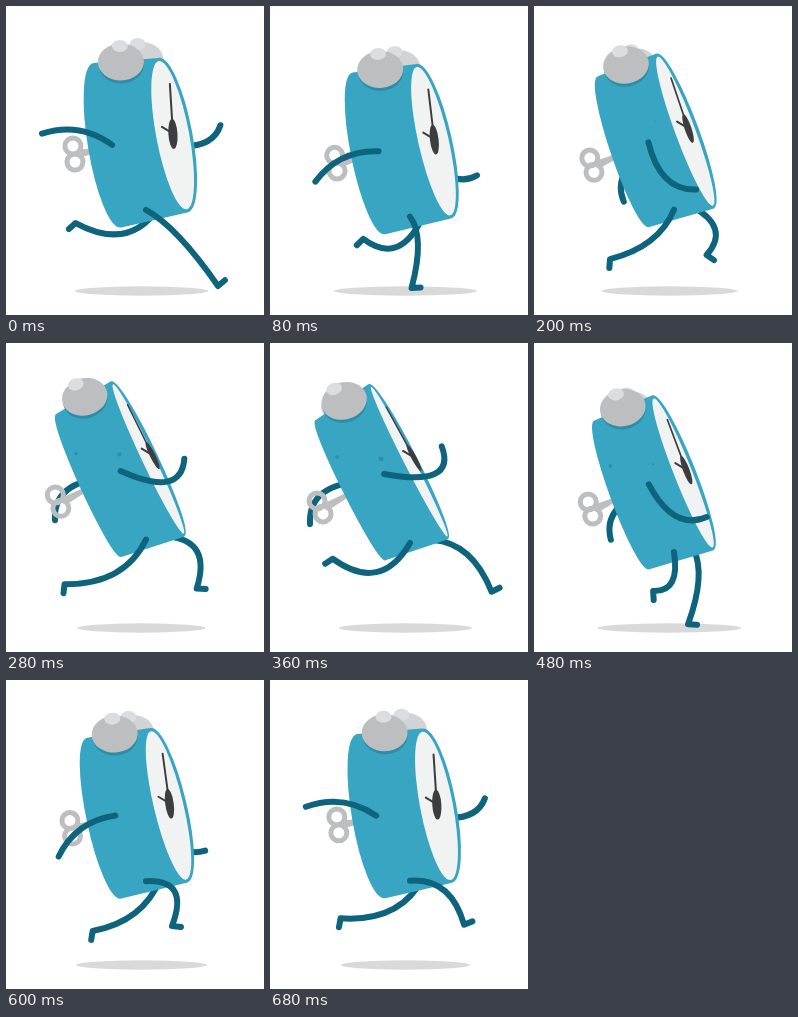
Animation of 258 by 309 pixels, one loop 0.72 s. Source, as an HTML page:

```html
<!DOCTYPE html>
<html lang="en">
<head>
<meta charset="utf-8">
<title>Running alarm clock</title>
<style>
  html, body { margin: 0; width: 100%; height: 100%; overflow: hidden; background: #fff; }
  svg { display: block; width: 100vw; height: 100vh; }
  .limb { fill: none; stroke: #0e647c; stroke-width: 6; stroke-linecap: round; stroke-linejoin: round; }
  .hand { fill: none; stroke: #3d3d3f; stroke-linecap: round; }
</style>
</head>
<body>
<svg id="stage" viewBox="0 0 258 309"></svg>
<script>
const LOOP = 720, STEP = 40, GROUND = 282;
const STEEL = '#bcbec0', TEAL = '#38a5c3', INK = '#3d3d3f';
const FAR_LAG = 390;
const rad = d => d * Math.PI / 180;
const wave = (t, beats, peak = 0) => Math.cos(2 * Math.PI * beats * (t - peak) / LOOP);

// One stride: time, knee bend x y, ankle x y, toe angle. x counts from the hip.
const STRIDE = [
  [0,   31, 221, 72, 280, -40],
  [85,  14, 231, -2, 282, 0],
  [205, -16, 241, -66, 252, 97],
  [285, -22, 242, -82, 240, 98],
  [345, -30, 248, -81, 214, 146],
  [445, -14, 262, -45, 244, 118],
  [530, 38, 222, 14, 249, 35],
  [600, 44, 199, 26, 246, 6],
  [685, 40, 198, 56, 246, -24]
];

// Smooth periodic curve through the key poses
function pose(rows, t) {
  t = (t % LOOP + LOOP) % LOOP;
  const n = rows.length;
  let i = n - 1;
  while (rows[i][0] > t) i--;
  const row = k => rows[(k + n) % n];
  const time = k => row(k)[0] + LOOP * Math.floor(k / n);
  const [t0, t1, t2, t3] = [i - 1, i, i + 1, i + 2].map(time);
  const h = t2 - t1, u = (t - t1) / h, v = 1 - u;
  return row(i).slice(1).map((b, j) => {
    const a = row(i - 1)[j + 1], c = row(i + 1)[j + 1], d = row(i + 2)[j + 1];
    const m1 = (c - a) / (t2 - t0) * h, m2 = (d - b) / (t3 - t1) * h;
    return b * (1 + 2 * u) * v * v + m1 * u * v * v + c * u * u * (3 - 2 * u) - m2 * u * u * v;
  });
}

function set(el, attrs) {
  for (const k in attrs) el.setAttribute(k, attrs[k]);
  return el;
}
function add(parent, tag, attrs) {
  const el = document.createElementNS('http://www.w3.org/2000/svg', tag);
  return parent.appendChild(set(el, attrs));
}
const stage = document.getElementById('stage');
const shadow = add(stage, 'ellipse', { cx: 135.5, cy: 285, ry: 4.7, fill: '#d9d9d9' });
const farLeg = add(stage, 'path', { class: 'limb' });
const body = add(stage, 'g', {});
const nearLeg = add(stage, 'path', { class: 'limb' });

const farArm = add(body, 'path', { class: 'limb' });
const stem = add(body, 'path', { fill: STEEL });
const rings = [0, 1].map(() => add(body, 'circle', { r: 8, fill: 'none', stroke: STEEL, 'stroke-width': 5 }));
const rearBell = add(body, 'ellipse', { rx: 22, ry: 17, fill: '#d1d3d4' });
const rearKnob = add(body, 'ellipse', { rx: 8, ry: 6, fill: '#dcddde' });
const shell = add(body, 'path', { fill: TEAL, stroke: TEAL, 'stroke-width': 3, 'stroke-linejoin': 'round' });
const face = add(body, 'ellipse', { fill: '#f1f2f2' });
const longHand = add(body, 'path', { class: 'hand' });
const shortHand = add(body, 'path', { class: 'hand', 'stroke-width': 2 });
const hub = add(body, 'ellipse', { ry: 15, fill: INK });
const rivets = [0, 1].map(() => add(body, 'circle', { fill: '#2c8fae' }));
const bellShade = add(body, 'ellipse', { rx: 22.5, ry: 18.5, fill: '#2e8ca7' });
const bell = add(body, 'ellipse', { rx: 23, ry: 18.5, fill: STEEL });
const knob = add(body, 'ellipse', { rx: 8, ry: 6, fill: '#dcddde' });
const nearArm = add(body, 'path', { class: 'limb' });

function oval(el, x, y, turn, more) {
  set(el, { cx: x, cy: y, transform: `rotate(${turn} ${x} ${y})`, ...more });
}

// Half length and turn of the ellipse axis between two points
function axis(x1, y1, x2, y2) {
  const dx = x2 - x1, dy = y2 - y1;
  return [Math.hypot(dx, dy) / 2, -Math.atan2(dx, dy) * 180 / Math.PI];
}

// Angle 0 hangs straight down, positive is forward; the elbow sits beside the chord
function arm(el, x, y, angle, reach, bend, slide) {
  const dx = Math.sin(rad(angle)), dy = Math.cos(rad(angle));
  const along = reach / 2 + slide;
  set(el, {
    d: `M${x} ${y}Q${x + dx * along - dy * bend} ${y + dy * along + dx * bend} ` +
       `${x + dx * reach} ${y + dy * reach}`
  });
}

function leg(el, hx, hy, t) {
  const [kx, ky, ax, ay, toe] = pose(STRIDE, t);
  const y = Math.min(ay, GROUND);
  const ty = Math.min(y + 9 * Math.sin(rad(toe)), GROUND);
  set(el, { d: `M${hx} ${hy}Q${hx + kx} ${ky} ${hx + ax} ${y}L${hx + ax + 9 * Math.cos(rad(toe))} ${ty}` });
}

function drawCase(s) {
  const fx = 152.5 - 53.5 * s, fy = 53.5 - 7 * s, gx = 181 - 4 * s, gy = 205 - 6 * s;
  const bx = 88 - 42 * s, by = 58.5 + 24 * s, cx = 115, cy = 220;
  const w = 16.5 - 11.5 * s, bw = 18 - 12 * s;
  const [fa, turn] = axis(fx, fy, gx, gy), [ba, bturn] = axis(bx, by, cx, cy);
  set(shell, {
    d: `M${bx} ${by}L${fx} ${fy}A${w + 1.7 + 1.5 * s} ${fa} ${turn} 0 1 ${gx} ${gy}` +
       `L${cx} ${cy}A${bw} ${ba} ${bturn} 0 1 ${bx} ${by}Z`
  });
  oval(face, (fx + gx) / 2 + 1.2 * s, (fy + gy) / 2, turn, { rx: w, ry: fa - 1.7 });

  const tx = 164 - 48 * s, ty = 78 - 10 * s, hx = 167 - 23 * s, hy = 128 - 9 * s;
  set(longHand, { d: `M${tx} ${ty}L${hx} ${hy}`, 'stroke-width': 1.2 + 0.05 * w });
  set(shortHand, { d: `M${hx - 11} ${hy - 7}l10 6` });
  oval(hub, hx, hy, axis(tx, ty, hx, hy)[1], { rx: 1.6 + 0.18 * w });

  const lean = turn + 10, dx = 115 - 41 * s, dy = 56 + 6 * s;
  const rx = 132 - 63 * s, ry = 38 + 12 * s;
  oval(bellShade, dx + 0.5, dy + 3, lean);
  oval(bell, dx, dy, lean);
  oval(knob, 114 - 50 * s, 40 + 10 * s, lean);
  oval(rearBell, rx + 3.5, ry + 15, lean);
  oval(rearKnob, rx, ry, lean);

  const back = 1 - s;
  set(rivets[0], { cx: 67 + 26 * back, cy: 118, r: Math.min(1.8, Math.max(0, 30 * (s - 0.57))) });
  set(rivets[1], { cx: 111 + 22 * back, cy: 120 - 10 * back, r: Math.max(0, 2.5 - 4 * back) });
}

function drawKey(s) {
  const ax = 67 - 20 * s, ay = 140 + 22 * s, bx = 69 - 16 * s, by = 156 + 19 * s;
  const mx = (ax + bx) / 2 + 6, my = (ay + by) / 2 - 1;
  set(rings[0], { cx: ax, cy: ay });
  set(rings[1], { cx: bx, cy: by });
  set(stem, { d: `M${mx} ${my - 4}L${86 - 6 * s} ${143 + 9 * s}v5L${mx + 2} ${my + 4}Z` });
}

function draw(t) {
  // 0 is upright with the near arm back, 1 is the full forward lean
  const phase = 2 * Math.PI * t / LOOP + rad(6 - 9 * Math.sin(2 * Math.PI * t / LOOP));
  const s = (1 - Math.cos(phase)) / 2;
  const bounce = wave(t, 2, 110);
  const bob = 6 * bounce + 2 * wave(t, 1);

  set(body, { transform: `translate(0 ${bob})` });
  set(shadow, { rx: 68 + 4 * bounce });
  drawCase(s);
  drawKey(s);

  const swing = s + 0.45 * s * (1 - s);
  arm(nearArm, 106 + 24 * s - 16 * s * s, 139 - 4 * s,
      -100 + 216 * swing, 71 - 7 * s, 18 + 26 * s * s, 28 * s * s);
  arm(farArm, 160 - 65 * s, 139 + 3 * s,
      -52 + 163 * (1 - s) ** 2.5, 58 + 12 * s, 22 + 11 * s, 12);

  leg(nearLeg, 140, 204 + bob, t);
  leg(farLeg, 153 + 10 * s, 201 + bob, t - FAR_LAG);
}

const start = performance.now();
function tick() {
  const t = (performance.now() - start) % LOOP;
  draw(Math.floor(t / STEP) * STEP);
  requestAnimationFrame(tick);
}
tick();
</script>
</body>
</html>
```
